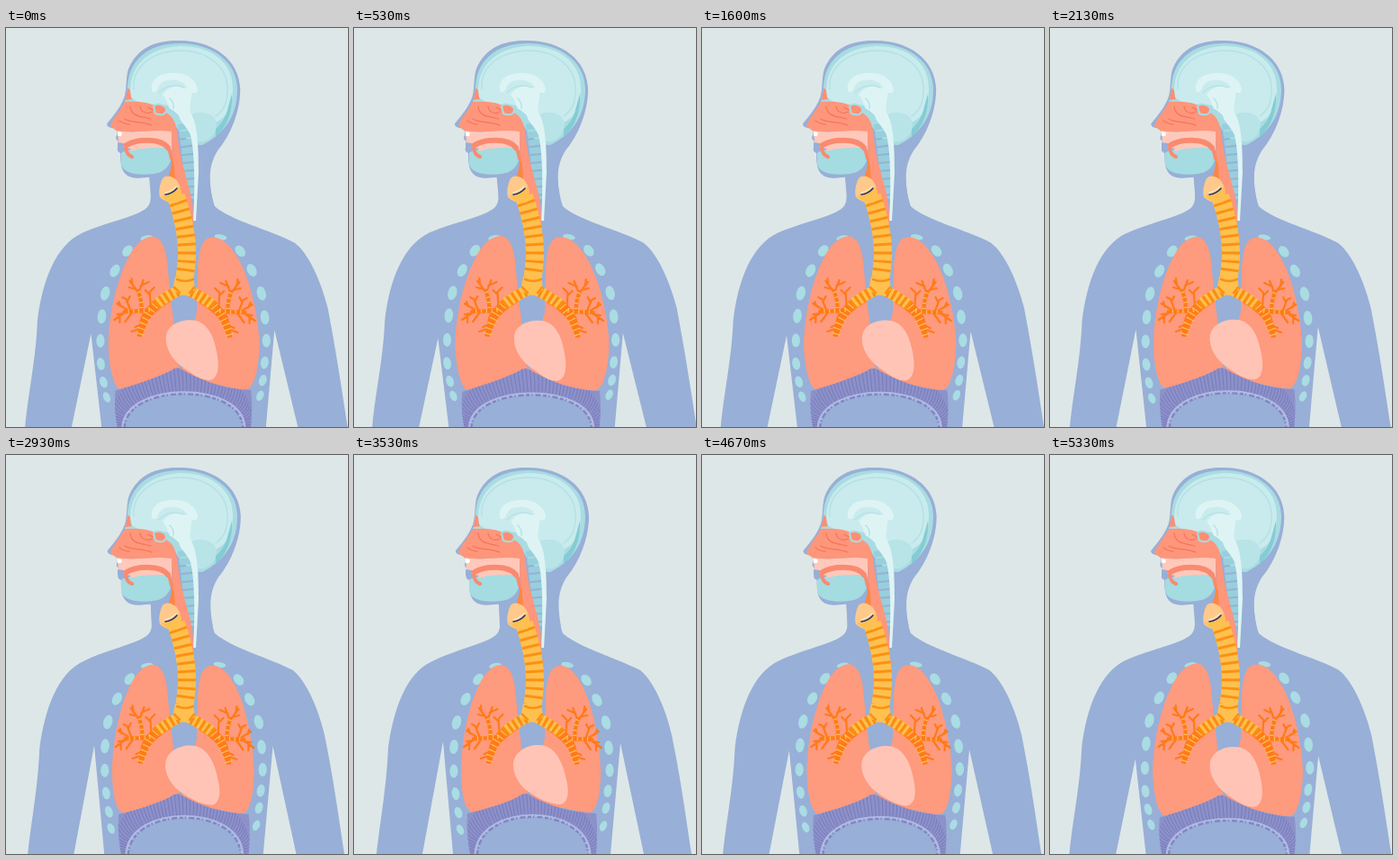
These frames come from a looping animation (380 px wide and 443 px high, 5.39 s). An HTML page:

```html
<!DOCTYPE html>
<html lang="en">
<head>
<meta charset="utf-8">
<title>Breathing</title>
<style>
html, body { margin: 0; width: 100%; height: 100%; overflow: hidden; background: #dde7e7; }
svg { display: block; width: 100vw; height: 100vh; }
.ln { fill: none; stroke-linecap: round; stroke-linejoin: round; }
.cut { fill: none; stroke-linecap: butt; }
</style>
</head>
<body>
<svg viewBox="0 0 380 443" preserveAspectRatio="none">
  <defs>
    <clipPath id="bandClip"><path id="bandEdge"/></clipPath>
    <g id="tree">
      <path fill="#ff7a1a" d="M176 294 L183 304 C171 311 163 318 158 326 L151 343 L146 342 L149 327 C149 318 160 304 176 294Z"/>
      <path class="ln" stroke="#ff7a1a" stroke-width="4.2" d="M163 311 C153 317 144 313 132 315 M151 313 Q151 301 147 292"/>
      <path class="ln" stroke="#ff7a1a" stroke-width="2.2" d="M134 315 L121 324 M137 314 L124 306 M130 317 L124 318 M128 309 L126 304
        M147 293 L138 281 M148 293 L153 280 M145 290 L137 288 M150 286 L159 282 M141 285 L140 278 M139 314 L134 301 L130 299
        M135 304 L138 298 M161 309 L160 293 L165 288 M160 296 L155 291 M141 315 L133 326 M151 329 L144 332 M149 334 L140 337 M127 320 L127 327"/>
      <path class="cut" stroke="#fec04f" stroke-width="12" d="M197 289 Q181 296 167 307"/>
      <path class="cut" stroke="#fb8d12" stroke-width="12" stroke-dasharray="3.2 3.2" d="M191 292 Q178 298 164 310"/>
      <path class="cut" stroke="#fec04f" stroke-width="9" stroke-dasharray="1.3 4.6" d="M166 308 Q155 320 149 341"/>
      <path class="cut" stroke="#fec04f" stroke-width="4.2" stroke-dasharray="1.2 4.6" d="M160 313 C150 316 144 313 132 315 M151 311 Q151 301 147 292"/>
    </g>
  </defs>
  <rect width="380" height="443" fill="#dde7e7"/>
  <g fill="#98afd7">
    <path id="body"/>
    <path id="head" d="M193 14 C168 13 146 21 136 45 C133 53 134 63 132 74 C130 83 121 96 112 106 C111 110 117 111 122 112 C124 114 124 117 122 121 C121 125 128 127 126 131 C123 134 122 136 127 139 C127 150 127 163 140 166 C148 168 155 165 160 166 L161 190 L229 190 C225 167 225 152 235 136 C250 118 260 92 260 68 C259 35 230 14 193 14Z"/>
  </g>

  <!-- skull and brain -->
  <path fill="#a8dce2" d="M132 82 C135 76 134 68 136 57 C141 31 163 17 193 17 C231 17 257 39 257 68 C257 94 246 116 218 130 C208 130 198 124 190 111 L184 100 L166 88 L150 84Z"/>
  <path fill="#c9ebed" d="M139 77 C134 47 154 22 193 20 C232 20 253 41 252 69 C251 88 245 99 235 104 C227 109 216 103 209 98 L196 100 L181 86 C166 83 154 90 139 77Z"/>
  <path fill="#84ccd4" d="M251 73 C252 96 244 111 233 121 L233 112 C238 108 244 100 246 91Z"/>
  <path class="ln" stroke="#b5e1e5" stroke-width="1.4" d="M142 68 C140 47 156 27 192 25 C225 24 245 44 246 65 C247 84 241 92 233 98"/>
  <path fill="#b8e4e8" d="M206 96 C217 91 232 94 234 106 C234 119 223 128 214 126 C208 121 205 112 206 96Z"/>

  <!-- neck vertebrae -->
  <path class="cut" stroke="#98cfdc" stroke-width="13" stroke-dasharray="7 2" d="M197 106 C201 128 204 155 206 190"/>

  <!-- brain stem and cord -->
  <g fill="#def4f4">
    <path d="M162 69 C160 55 174 49 188 50 C201 50 211 57 213 68 C213 74 206 73 203 69 C199 60 190 56 181 58 C171 59 170 65 168 69 C166 72 163 72 162 69Z"/>
    <path d="M174 74 C179 65 196 60 206 70 C207 78 203 86 205 94 C213 106 214 132 214 160 L211 214 L208 214 C210 180 210 139 205 119 C201 109 193 104 192 97 L185 91 C179 90 181 81 174 74Z"/>
  </g>
  <path class="ln" stroke="#b8e3e7" stroke-width="1.6" d="M170 72 C177 64 188 62 198 66 M182 78 Q187 83 186 89"/>

  <!-- nose, mouth, throat -->
  <path fill="#fe967b" d="M132 82 C145 81 160 82 167 87 L181 96 C188 101 190 112 191 122 C193 146 203 172 207 194 L210 240 L204 240 L196 200 L185 168 L184 116 L124 115 L116 109 C118 101 126 93 132 82Z"/>
  <path fill="#fe8e72" d="M135 67 C139 66 138 76 140 79 L133 80 Z"/>
  <path fill="#fe8e72" stroke="#a8dce2" stroke-width="2" d="M164 87 C167 83 176 85 178 90 C178 97 172 97 166 95Z"/>
  <path class="ln" stroke="#f4755c" stroke-width="1.3" d="M138 87 C139 99 151 98 161 101 M149 87 C150 94 157 96 162 93 M132 101 C140 106 151 103 162 108 M126 103 Q132 107 137 107 M158 88 L163 91"/>
  <path fill="#ffc8ba" d="M124 114 C145 118 162 112 184 115 L184 140 L133 133 L125 128Z"/>
  <path fill="#fff" d="M124 115 L129 116 L128 120 L124 120Z"/>
  <path fill="#a4dce1" d="M128 139 C133 134 148 133 183 133 L184 141 C183 154 175 161 163 162 C148 164 130 162 128 151Z"/>
  <path fill="#98afd7" d="M124 127 L131 128 L131 133 L124 134Z"/>
  <path fill="#ffc8ba" d="M137 130 C150 122 167 122 180 134 C168 131 149 133 139 137Z"/>
  <path class="ln" stroke="#f98a70" stroke-width="6" d="M134 130 C145 123 172 122 180 133"/>
  <path class="ln" stroke="#f98a70" stroke-width="4" d="M180 132 Q183 138 184 145 M133 133 Q134 141 140 143"/>
  <path fill="#fb8744" d="M184 144 C184 152 184 156 180 166 L188 170 L187 153Z"/>

  <g id="ribs" fill="#a9dce3"></g>
  <g fill="#fe9a7e"><path id="lungL"/><path id="lungR"/></g>
  <path id="band" fill="#8c91c9"/>
  <g clip-path="url(#bandClip)"><path id="fibres" class="ln" stroke="#7778b9" stroke-width=".9"/></g>
  <path id="rim" class="cut" stroke="#b0bae2" stroke-width="3"/>
  <path id="fringe" class="cut" stroke="#8086c4" stroke-width="2.4" stroke-dasharray="4 2 1.5 3 6 2.5"/>

  <!-- windpipe -->
  <g id="bronchi">
    <use href="#tree"/>
    <use href="#tree" transform="matrix(-1 0 0 1 397 1)"/>
  </g>
  <path class="cut" stroke="#fec04f" stroke-width="20" d="M189 187 C196 207 201 227 201 250 C201 265 198 275 198 287"/>
  <path class="cut" stroke="#fb9112" stroke-width="20" stroke-dasharray="3 6.4" d="M191 193 C197 210 201 230 201 250 C201 265 198 275 198 285"/>
  <path fill="#fec04f" d="M188 276 L208 276 L210 291 L198 297 L185 292Z"/>
  <path class="ln" stroke="#fb9112" stroke-width="2.6" d="M190 279 Q199 283 208 279 M187 288 L193 294 M204 294 L209 288"/>
  <path fill="#fec98b" d="M174 167 C178 162 187 165 191 171 C195 178 196 187 193 192 C187 196 178 194 171 188 C169 181 171 173 174 167Z"/>
  <path fill="#fec04f" d="M172 186 C180 188 188 183 193 176 C196 184 195 190 193 192 C187 196 178 194 172 186Z"/>
  <path class="ln" stroke="#ffe6c4" stroke-width="1.4" d="M177 183 Q184 181 189 176"/>
  <path class="ln" stroke="#26365f" stroke-width="1.6" d="M177 185 Q185 184 190 178"/>
  <path id="heart" fill="#ffc4b6"/>
</svg>
<script>
const LOOP = 5390, STEP = 1000 / 15, PEAK = 880;
const $ = id => document.getElementById(id);
const mix = (full, empty, k) => empty + (full - empty) * k;

// each shape: lungs full, lungs empty
const shapes = {
  body: [
    "M158 160 C160 185 162 190 158 197 C152 208 112 215 84 227 C54 241 39 281 34 325 C32 370 24 400 20 443 L72 443 L93 346 L105 443 L290 443 L299 340 L325 443 L381 443 C373 390 368 360 359 311 C351 280 336 248 321 238 C295 224 250 214 232 198 C226 180 224 155 230 140 L200 120Z",
    "M161 160 C162 185 164 190 160 197 C154 208 115 215 87 229 C58 242 44 282 38 325 C36 370 30 400 25 443 L76 443 L99 318 L110 443 L285 443 L296 320 L322 443 L375 443 C367 390 363 360 353 311 C346 280 332 250 318 239 C293 226 250 214 232 198 C226 180 224 155 230 140 L200 120Z"],
  lungL: [
    "M164 231 C175 233 179 249 180 270 L183 300 L194 392 C160 394 142 404 127 403 C118 402 112 372 112 350 C113 312 124 274 136 253 C143 239 153 231 164 231Z",
    "M164 233 C175 235 179 250 180 270 L183 300 L194 388 C160 389 146 397 132 397 C122 395 119 372 119 350 C120 311 128 278 139 255 C146 241 154 233 164 233Z"],
  lungR: [
    "M229 232 C217 232 214 247 213 270 L212 315 L192 392 C236 394 252 404 269 403 C279 400 284 372 284 348 C282 314 272 275 257 252 C248 239 240 232 229 232Z",
    "M229 234 C217 234 214 249 213 270 L212 315 L192 388 C232 389 250 397 262 397 C271 395 274 372 274 350 C273 316 265 277 253 255 C246 242 239 234 229 234Z"],
  band: [
    "M120 404 C140 398 167 389 183 381 Q190 375 198 381 C216 391 243 403 273 403 C275 418 274 432 273 443 L267 443 C264 394 131 394 127 443 L122 443 C119 429 119 415 120 404Z",
    "M126 398 C143 394 169 387 183 379 Q190 373 198 379 C216 389 240 397 269 398 C271 415 270 430 269 443 L263 443 C260 385 137 385 134 443 L129 443 C126 427 125 412 126 398Z"],
  rim: [
    "M128 443 C132 394 263 394 266 443",
    "M135 443 C138 386 259 386 262 443"],
  fringe: [
    "M130 443 C134 396 261 396 264 443",
    "M137 443 C140 388 257 388 260 443"],
  heart: [
    "M205 325 C223 325 231 342 234 362 C237 380 234 391 225 392 C214 392 207 384 195 376 C185 368 177 356 178 343 C179 332 190 325 205 325Z",
    "M205 322 C223 322 232 340 236 361 C240 376 237 387 229 388 C216 387 206 382 194 374 C184 367 176 355 177 342 C179 330 190 322 205 322Z"]
};

// rib columns: x full, y full, x empty, y empty
const ribSides = [
  [[156,233,157,234],[134,247,138,249],[120,269,124,271],[109,294,114,297],[105,319,111,324],[103,346,111,351],[103,372,113,376],[106,392,116,397],[110,408,118,416]],
  [[239,232,237,233],[261,247,258,250],[274,268,270,272],[285,294,280,297],[289,320,283,325],[291,346,284,350],[289,371,282,373],[287,391,280,392],[284,407,277,412]]
];
const tilt = [80, 38, 28, 15, 6, 0, -10, -18, -24];
const size = [[3, 7], [5, 7], [5, 7.5], [5, 8], [4.8, 8], [4.6, 7.5], [4.4, 7], [4.2, 6.5], [3.8, 6]];
const ribs = ribSides.flatMap((side, s) => side.map((p, i) => {
  const el = document.createElementNS("http://www.w3.org/2000/svg", "ellipse");
  el.setAttribute("rx", size[i][0]);
  el.setAttribute("ry", size[i][1]);
  $("ribs").append(el);
  return { el, p, turn: s ? -tilt[i] : tilt[i] };
}));

function morph([full, empty], k) {
  const nums = empty.match(/-?[\d.]+/g);
  let i = 0;
  return full.replace(/-?[\d.]+/g, n => mix(+n, +nums[i++], k).toFixed(2));
}

function fibres(k) {
  const rx = mix(70, 64, k), ry = mix(37, 43, k), n = 56;
  let d = "";
  for (let i = 0; i <= n; i++) {
    const a = Math.PI * i / n, c = Math.cos(a), s = Math.sin(a);
    const wave = 1.5 * Math.sin(i * 2.4);
    d += `M${(197 - rx * c).toFixed(1)} ${(443 - (ry + wave) * s).toFixed(1)}` +
      `Q${(197 - (rx + 8) * c).toFixed(1)} ${(443 - (ry + 10) * s).toFixed(1)} ` +
      `${(195 - (rx + 12) * c).toFixed(1)} ${(443 - (ry + 32) * s).toFixed(1)}`;
  }
  return d;
}

function draw(t) {
  const e = Math.cos(2 * Math.PI * (t - PEAK) / LOOP), k = (e + 1) / 2;
  for (const id in shapes) $(id).setAttribute("d", morph(shapes[id], k));
  $("bandEdge").setAttribute("d", morph(shapes.band, k));
  $("fibres").setAttribute("d", fibres(k));
  $("head").setAttribute("transform", `translate(${0.5 - 0.5 * e} 0)`);
  $("bronchi").setAttribute("transform", `translate(198 290) scale(${1 + 0.015 * e} 1) translate(-198 -290)`);
  for (const { el, p, turn } of ribs) {
    el.setAttribute("transform", `translate(${mix(p[0], p[2], k)} ${mix(p[1], p[3], k)}) rotate(${turn})`);
  }
}

const start = performance.now();
function tick() {
  const t = Math.max(0, performance.now() - start) % LOOP;
  draw(Math.floor(t / STEP) * STEP);
  requestAnimationFrame(tick);
}
draw(0);
requestAnimationFrame(tick);
</script>
</body>
</html>
```
